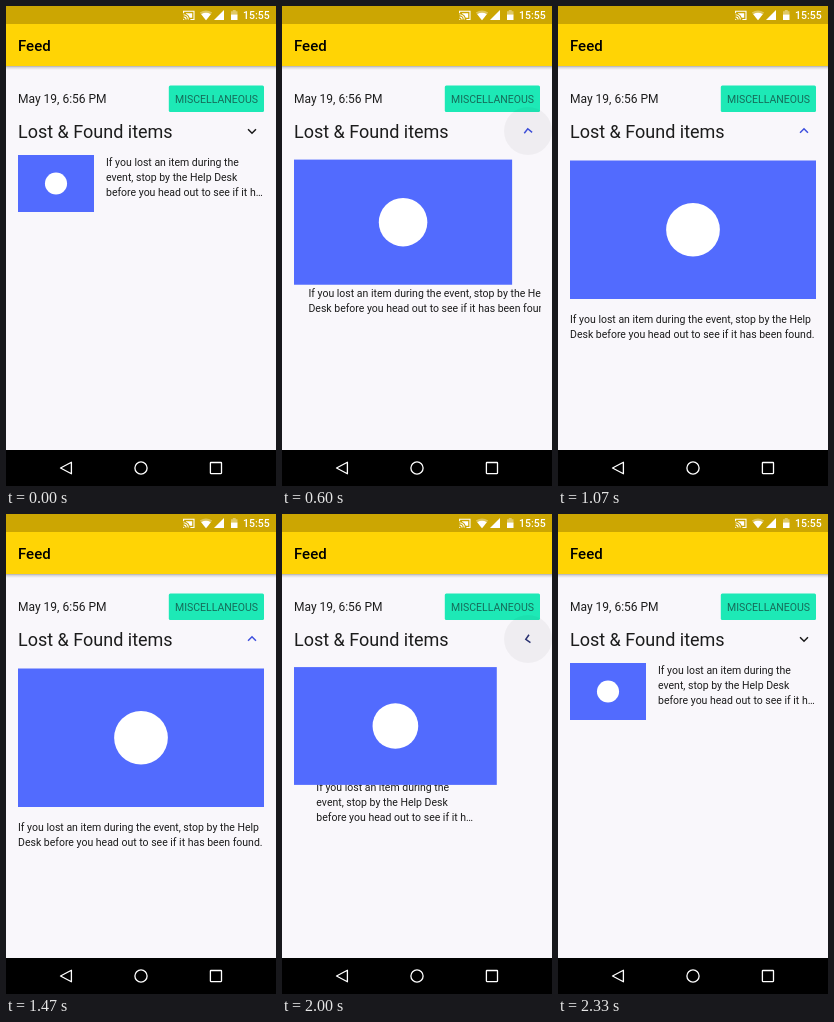
An HTML page that plays this animation: 270x480 px, repeating every 2.54 s.

```html
<!DOCTYPE html>
<html lang="en">
<head>
<meta charset="utf-8">
<title>Feed</title>
<style>
  html, body { margin: 0; width: 100%; height: 100%; overflow: hidden; background: #f9f7fb; }
  svg { display: block; width: 100%; height: 100%; }
  text { font-family: Roboto, "Noto Sans", sans-serif; fill: #1c1c1c; }
  .body { font-size: 10.5px; }
</style>
</head>
<body>
<svg viewBox="0 0 270 480">
  <defs>
    <clipPath id="card"><rect x="12" y="140" width="247" height="304"/></clipPath>
    <linearGradient id="shade" x2="0" y2="1">
      <stop stop-opacity=".3"/>
      <stop offset=".4" stop-opacity=".12"/>
      <stop offset="1" stop-opacity="0"/>
    </linearGradient>
  </defs>

  <rect width="270" height="480" fill="#f9f7fb"/>

  <!-- status bar -->
  <rect width="270" height="18" fill="#cca602"/>
  <g fill="#fff">
    <path d="M177.6 7.2V5.3H188v8.2h-3.6M177.6 8.8a4.7 4.7 0 0 1 4.7 4.7M177.6 11a2.5 2.5 0 0 1 2.5 2.5" fill="none" stroke="#fff" stroke-width="1.1"/>
    <path d="M180 7.2h6.2v4.5h-2.4q-.9-2.9-3.8-3.9zM177.2 12.4v1.5h1.5z"/>
    <path d="M193.8 6.6q6.2-4.4 12.4 0L200 14.2z" opacity=".35"/>
    <path d="M195.2 8.2q4.8-2.8 9.6 0L200 14.2z"/>
    <path d="M218 4v10h-10z"/>
    <path d="M225 5.2h1.8V4h2.9v1.2h1.8v4h-6.5z" opacity=".4"/>
    <path d="M225 8.6h6.5V14H225z"/>
    <text x="237" y="13" font-size="10.5" font-weight="500" style="fill:#fff">15:55</text>
  </g>

  <!-- app bar -->
  <rect y="18" width="270" height="42" fill="#ffd405"/>
  <rect y="60" width="270" height="4" fill="url(#shade)"/>
  <text x="12" y="45" font-size="15" font-weight="500" style="fill:#000">Feed</text>

  <!-- item header -->
  <text x="12" y="97" font-size="12">May 19, 6:56 PM</text>
  <rect x="162.8" y="79.6" width="95.2" height="26.4" rx="1.5" fill="#1de9b6"/>
  <text x="169" y="97" font-size="10.5" style="fill:#166c5a">MISCELLANEOUS</text>
  <text x="12" y="132" font-size="18">Lost &amp; Found items</text>
  <circle id="ripple" cx="246" cy="125" opacity="0"/>
  <path id="arrow" d="M-3.95-2.05 0 1.95 3.95-2.05" fill="none" stroke-width="1.5"/>

  <!-- item content -->
  <g clip-path="url(#card)">
    <g id="short" class="body">
      <text>If you lost an item during the</text>
      <text y="15">event, stop by the Help Desk</text>
      <text y="30">before you head out to see if it h…</text>
    </g>
    <g id="long" class="body">
      <text>If you lost an item during the event, stop by the Help</text>
      <text y="15">Desk before you head out to see if it has been found.</text>
    </g>
    <rect id="photo" x="12" fill="#526bfe"/>
    <circle id="dot" fill="#fff"/>
  </g>

  <!-- navigation bar -->
  <rect y="444" width="270" height="36" fill="#000"/>
  <g fill="none" stroke="#fff" stroke-width="1.3">
    <path d="M65.4 456.2v11.6L54.5 462z" stroke-linejoin="round"/>
    <circle cx="135" cy="462" r="6.1"/>
    <rect x="204.4" y="456.5" width="11.1" height="11.1" rx=".5"/>
  </g>
</svg>
<script>
  const LOOP = 2540, FPS = 15, MOVE = 324;
  const OPEN = 362, CLOSE = 1891;
  const TURN = 315, TURN_BACK = 1826;

  const $ = id => document.getElementById(id);
  const [ripple, arrow, short, long, photo, dot] =
    ['ripple', 'arrow', 'short', 'long', 'photo', 'dot'].map($);

  const set = (el, attrs) => {
    for (const k in attrs) el.setAttribute(k, attrs[k]);
  };
  const lerp = (a, b, p) => a + (b - a) * p;
  const ramp = (t, from, len) => Math.min(1, Math.max(0, (t - from) / len));
  const ease = x => (1 - Math.cos(Math.PI * x)) / 2;
  const toggle = (t, on, off) => ease(ramp(t, on, MOVE)) - ease(ramp(t, off, MOVE));

  function drawRipple(t, start, grow, fadeAt, fade) {
    const g = ramp(t, start, grow);
    set(ripple, {
      r: 24 * Math.sqrt(g),
      opacity: 0.04 * g * (1 - ramp(t, fadeAt, fade))
    });
  }

  function draw(t) {
    const p = toggle(t, OPEN, CLOSE);
    const turn = toggle(t, TURN, TURN_BACK);
    const w = lerp(76, 246, p), h = lerp(57, 138.5, p), y = lerp(149, 154.5, p);

    set(photo, { y, width: w, height: h });
    set(dot, { cx: 12 + w / 2, cy: y + h / 2, r: h * 0.194 });

    const isOpen = t >= OPEN && t < CLOSE;
    const at = `translate(${lerp(100, 12, p)} ${lerp(160.2, 316.8, p)})`;
    set(short, { transform: at, visibility: isOpen ? 'hidden' : 'visible' });
    set(long, { transform: at, visibility: isOpen ? 'visible' : 'hidden' });

    const [r, g, b] = [[24, 62], [24, 80], [24, 222]].map(([from, to]) => Math.round(lerp(from, to, turn)));
    set(arrow, {
      transform: `translate(246 125) rotate(${180 * turn}) translate(0 .3)`,
      stroke: `rgb(${r},${g},${b})`
    });

    if (t < 1400) drawRipple(t, 400, 170, 600, 270);
    else drawRipple(t, 1840, 150, 2010, 270);
  }

  function tick() {
    const t = performance.now() % LOOP;
    draw(Math.floor((t + 4) * FPS / 1000) * 1000 / FPS);
    requestAnimationFrame(tick);
  }
  tick();
</script>
</body>
</html>
```
